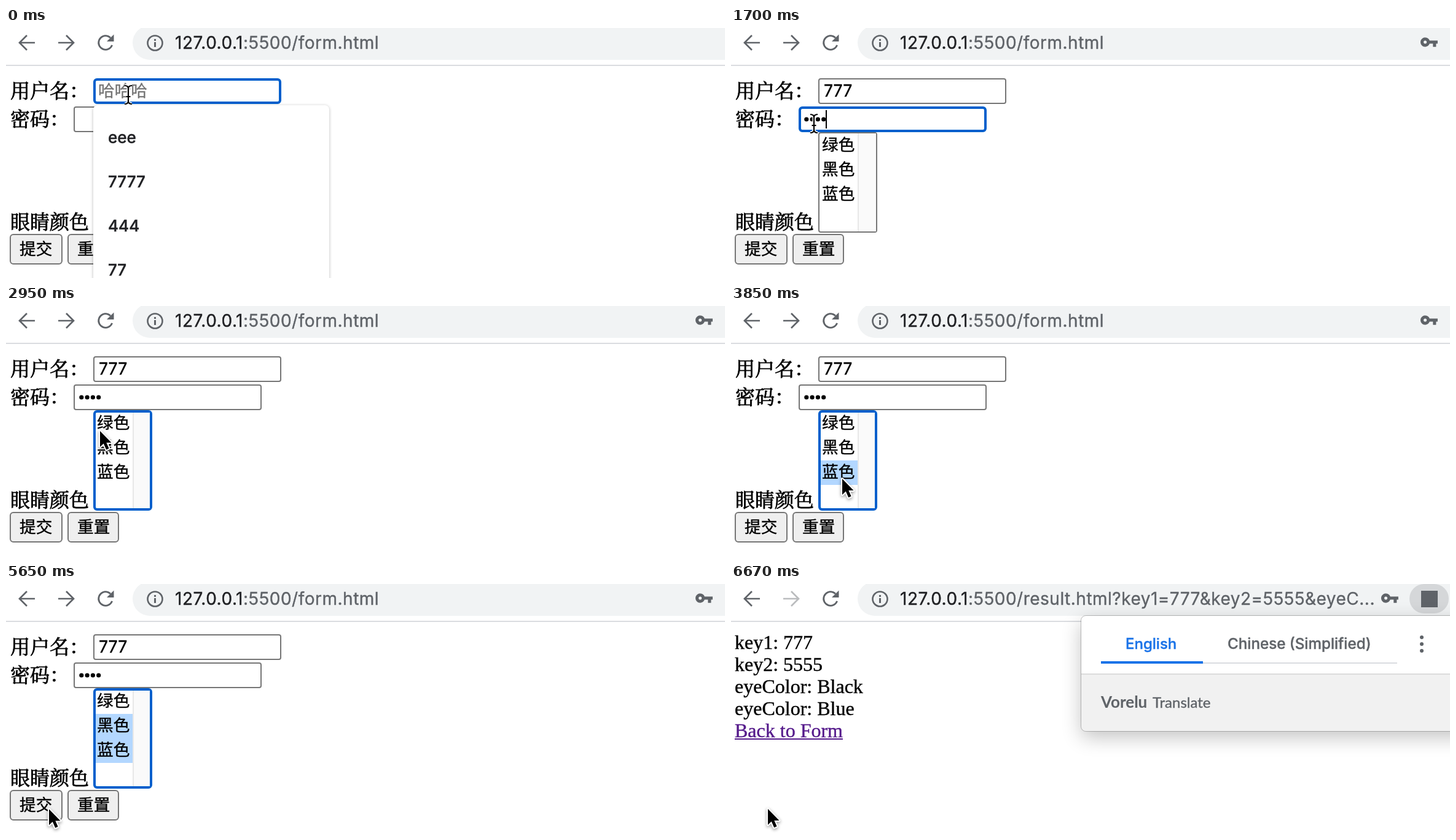
An HTML page with a canvas for the animation above (6.75 s loop, 1170 by 408 pixels).

```html
<!DOCTYPE html>
<html lang="zh-CN">
<head>
<meta charset="utf-8">
<title>Form demo</title>
<style>
html, body { margin: 0; width: 100%; height: 100%; overflow: hidden; background: #fff; }
canvas { display: block; width: 1170px; height: 408px; }
</style>
</head>
<body>
<canvas id="stage" width="1170" height="408"></canvas>
<script>
const ctx = document.getElementById('stage').getContext('2d');
const LOOP = 6750, STEP = 50;
const UI = 'Inter, "Noto Sans CJK SC", "Noto Sans CJK", sans-serif';
const CJK_SERIF = '"Noto Serif CJK SC", "Noto Sans CJK SC", "Noto Sans CJK", serif';
const SERIF = '"Liberation Serif", serif';
const GREY = '#5f6368', DARK = '#202124', BORDER = '#767676', FOCUS = '#005fcc';
const USER = '777', PASS = '5555';
const SAVED = ['eee', '7777', '444', '77'];
const COLORS = ['绿色', '黑色', '蓝色'];

const clamp = v => Math.max(0, Math.min(1, v));
const ramp = (t, a, b) => clamp((t - a) / (b - a));

// time, x, y of the pointer; equal neighbours are rests
const PATH = [
  [0, 199, 109], [750, 199, 109], [1050, 119, 152], [1550, 119, 152],
  [1700, 135, 156], [1750, 135, 157], [2250, 169, 307], [2550, 169, 307],
  [2600, 168, 306], [2700, 168, 306], [2950, 152, 203], [3150, 152, 203],
  [3300, 152, 216], [3450, 152, 216], [3850, 180, 281], [4100, 160, 236],
  [4500, 160, 236], [4550, 159, 262], [4900, 159, 262], [4950, 140, 296],
  [5600, 72, 365], [5700, 66, 368], [5850, 66, 368], [6000, 59, 366], [LOOP, 59, 366]
];

function pointerAt(t) {
  const i = Math.max(1, PATH.findIndex(p => p[0] >= t));
  const a = PATH[i - 1], b = PATH[i];
  const k = ramp(t, a[0], b[0]), e = k * k * (3 - 2 * k);
  return [a[1] + (b[1] - a[1]) * e, a[2] + (b[2] - a[2]) * e];
}

// a hairline stroke gives the slightly heavy look of smoothed screen text
function text(s, x, y, font, color, heavy = 0.4) {
  ctx.font = font;
  ctx.fillStyle = ctx.strokeStyle = color;
  ctx.lineWidth = heavy;
  ctx.fillText(s, x, y);
  ctx.strokeText(s, x, y);
  return ctx.measureText(s).width;
}

function rect(x, y, w, h, color) {
  ctx.fillStyle = color;
  ctx.fillRect(x, y, w, h);
}

function round(x, y, w, h, r) {
  ctx.beginPath();
  ctx.roundRect(x, y, w, h, r);
}

function frame(x, y, w, h, fill, stroke, line, r) {
  round(x + line / 2, y + line / 2, w - line, h - line, r);
  ctx.fillStyle = fill;
  ctx.fill();
  ctx.strokeStyle = stroke;
  ctx.lineWidth = line;
  ctx.stroke();
}

function control(x, y, w, h, focused) {
  frame(x, y, w, h, '#fff', focused ? FOCUS : BORDER, focused ? 4 : 2, focused ? 4 : 3);
}

function lines(color, width, ...paths) {
  ctx.strokeStyle = color;
  ctx.lineWidth = width;
  ctx.beginPath();
  for (const p of paths) p.forEach(([x, y], i) => i ? ctx.lineTo(x, y) : ctx.moveTo(x, y));
  ctx.stroke();
}

function disc(x, y, r, color) {
  ctx.fillStyle = color;
  ctx.beginPath();
  ctx.arc(x, y, r, 0, 7);
  ctx.fill();
}

function withShadow(color, blur, dy, draw) {
  ctx.save();
  ctx.shadowColor = color;
  ctx.shadowBlur = blur;
  ctx.shadowOffsetY = dy;
  draw();
  ctx.restore();
}

function arrow(cx, dir, color) {
  const tip = cx - 12 * dir;
  lines(color, 2.7, [[tip, 24], [cx + 13 * dir, 24]],
    [[cx, 12], [tip, 24], [cx, 36]]);
}

function reload() {
  ctx.strokeStyle = GREY;
  ctx.lineWidth = 2.8;
  ctx.beginPath();
  ctx.arc(162, 24, 11.3, 0.35, 5.5);
  ctx.stroke();
  ctx.fillStyle = GREY;
  ctx.beginPath();
  ctx.moveTo(175.5, 10.5);
  ctx.lineTo(175.5, 22);
  ctx.lineTo(164, 22);
  ctx.fill();
}

const KEY = new Path2D('M12.65 10A6 6 0 1 0 12.65 14H17v4h4v-4h2v-4zM7 14a2 2 0 1 1 0-4a2 2 0 0 1 0 4z');
function keyIcon(cx) {
  ctx.save();
  ctx.translate(cx - 15.3, 7.8);
  ctx.scale(1.27, 1.27);
  ctx.fillStyle = GREY;
  ctx.fill(KEY, 'evenodd');
  ctx.restore();
}

function address(done) {
  const font = '28px ' + UI;
  const path = done ? `:5500/result.html?key1=${USER}&key2=${PASS}&eyeC...` : ':5500/form.html';
  ctx.letterSpacing = '0.5px';
  const w = text('127.0.0.1', 275, 34, font, DARK);
  text(path, 275 + w, 34, font, GREY);
  ctx.letterSpacing = '0px';
}

function toolbar(t) {
  const done = t >= 6500, offer = t >= 6600;
  arrow(34, 1, GREY);
  arrow(98, -1, done ? '#babcbe' : GREY);
  if (t >= 6300 && t < 6550) {
    lines(GREY, 2.8, [[151, 13], [173, 35]], [[173, 13], [151, 35]]);
  } else reload();
  round(206, -4, 1020, 56, 28);
  ctx.fillStyle = '#f1f3f4';
  ctx.fill();
  ctx.strokeStyle = GREY;
  ctx.lineWidth = 2.6;
  ctx.beginPath();
  ctx.arc(242.5, 24.5, 12, 0, 7);
  ctx.stroke();
  rect(241, 23, 3, 8, GREY);
  rect(241, 18, 3, 3, GREY);

  address(done);
  if (t >= 1250) keyIcon(offer ? 1072 : 1136);
  if (offer) {
    round(1104, 0, 64, 48, 24);
    ctx.fillStyle = '#d5d7d9';
    ctx.fill();
    rect(1123, 11, 27, 27, GREY);
  }
  rect(0, 60, 1170, 2, '#dadce0');
}

function button(label, x, w, hot) {
  frame(x, 336, w, 50, hot ? '#e5e5e5' : '#efefef', hot ? '#4f4f4f' : BORDER, 2, 5);
  text(label, x + 16, 370, '26.67px ' + UI, '#000');
}

function colorList(t) {
  const focused = t >= 2300 && t < 6000;
  control(142, 170, 96, 164, focused);
  const edge = focused ? 4 : 2;
  rect(206, 170 + edge, 32 - edge, 164 - 2 * edge, '#fafafa');
  rect(206, 170 + edge, 2, 164 - 2 * edge, '#e8e8e8');
  COLORS.forEach((name, i) => {
    const y = 172 + 40 * i;
    const chosen = i === 2 && t >= 3750 || i === 1 && t >= 4300;
    if (chosen) rect(142 + edge, y, 64 - edge, 40, focused ? '#b3d7ff' : '#cecece');
    text(name, 148, y + 28, '26.67px ' + UI, '#000');
  });
}

function popup(items, alpha) {
  if (alpha <= 0 || !items.length) return;
  ctx.save();
  ctx.globalAlpha = alpha;
  withShadow('rgba(0,0,0,.28)', 5, 1, () => {
    round(142, 126, 384, 33 + 72 * items.length, 7);
    ctx.fillStyle = '#fff';
    ctx.fill();
  });
  items.forEach((s, i) => text(s, 166, 188 + 72 * i, '500 26px ' + UI, DARK));
  ctx.restore();
}

function formPage(t) {
  const typed = USER.slice(0, [50, 500, 650].filter(k => t >= k).length);
  const dots = [1250, 1400, 1550, 1700].filter(k => t >= k).length;
  const field = '26.67px ' + UI;
  const label = (s, y) => text(s, 7, y, '32px ' + CJK_SERIF, '#000', 0.8);
  label('用户名：', 114);
  label('密码：', 160);
  label('眼睛颜色', 328);

  control(142, 82, 306, 42, t < 1100);
  if (typed) {
    const w = text(typed, 151, 112, field, '#000');
    if (t < 1100) rect(152 + w, 88, 2, 30, '#000');
  } else text('哈哈哈', 150, 112, field, '#757575');

  const inPass = t >= 1100 && t < 2300;
  control(110, 128, 306, 42, inPass);
  for (let i = 0; i < dots; i++) disc(122.8 + 9.3 * i, 149, 3.6, '#000');
  if (inPass) rect(118 + 9 * dots, 134, 2, 30, '#000');

  colorList(t);
  button('提交', 6, 86, t >= 6300);
  button('重置', 100, 84, false);

  const matches = SAVED.filter(s => typed && s.startsWith(typed));
  popup(matches, 1 - ramp(t, 700, 850));
  popup([...SAVED, ''], 1 - ramp(t, 0, 150));
}

function resultPage() {
  const font = '32px ' + SERIF;
  [`key1: ${USER}`, `key2: ${PASS}`, 'eyeColor: Black', 'eyeColor: Blue']
    .forEach((s, i) => text(s, 6, 106 + 36 * i, font, '#000'));
  const w = text('Back to Form', 6, 250, font, '#551a8b');
  rect(6, 252, w, 2, '#551a8b');
}

function translateCard(alpha) {
  if (alpha <= 0) return;
  ctx.save();
  ctx.globalAlpha = alpha;
  withShadow('rgba(0,0,0,.24)', 32, 10, () => {
    round(570, 52, 640, 188, 8);
    ctx.fillStyle = '#fff';
    ctx.fill();
  });
  round(570, 147, 640, 93, [0, 0, 8, 8]);
  ctx.fillStyle = '#f1f1f1';
  ctx.fill();
  rect(570, 146, 640, 2, '#dcdcdc');
  round(569.5, 51.5, 640, 189, 8);
  ctx.strokeStyle = 'rgba(0,0,0,.22)';
  ctx.lineWidth = 1;
  ctx.stroke();
  text('English', 642, 106, '500 24px ' + UI, '#1a73e8');
  text('Chinese (Simplified)', 808, 106, '500 24.2px ' + UI, GREY);
  rect(768, 128, 316, 2, '#dadce0');
  rect(602, 126, 166, 4, '#1a73e8');
  for (const y of [87, 98, 109]) disc(1124, y, 3, GREY);
  text('Vorelu', 602, 202, '700 26px Lato, sans-serif', GREY, 0.1);
  text('Translate', 686, 202, '24px Lato, sans-serif', GREY);
  ctx.restore();
}

const ARROW = new Path2D('M0 0V26L5.8 20.5L10.2 30.5L14.6 28.6L10.4 19H18.5Z');
const BEAM = new Path2D('M-6 -15Q0 -15 0 -10Q0 -15 6 -15M0 -11V11M-6 15Q0 15 0 10Q0 15 6 15M-3.5 3H3.5');

function pointer(t) {
  if (t >= 50 && t < 750 || t >= 1250 && t < 1550) return;
  const [x, y] = pointerAt(t);
  ctx.save();
  ctx.translate(x, y);
  ctx.lineJoin = 'round';
  if (t < 2000 && y < 170) {
    ctx.strokeStyle = '#fff';
    ctx.lineWidth = 5;
    ctx.stroke(BEAM);
    ctx.strokeStyle = '#000';
    ctx.lineWidth = 2.2;
    ctx.stroke(BEAM);
  } else {
    ctx.translate(1, 1);
    withShadow('rgba(0,0,0,.4)', 5, 2, () => {
      ctx.strokeStyle = '#fff';
      ctx.lineWidth = 4;
      ctx.stroke(ARROW);
    });
    ctx.fillStyle = '#000';
    ctx.fill(ARROW);
  }
  ctx.restore();
}

function draw(now) {
  const t = Math.floor(now % LOOP / STEP) * STEP;
  rect(0, 0, 1170, 408, '#fff');
  toolbar(t);
  if (t < 6500) formPage(t);
  else {
    resultPage();
    translateCard(ramp(t, 6550, 6650));
  }
  pointer(t);
}

let start;
function tick(now) {
  start ??= now;
  draw(now - start);
  requestAnimationFrame(tick);
}
draw(0);
requestAnimationFrame(tick);
</script>
</body>
</html>
```
